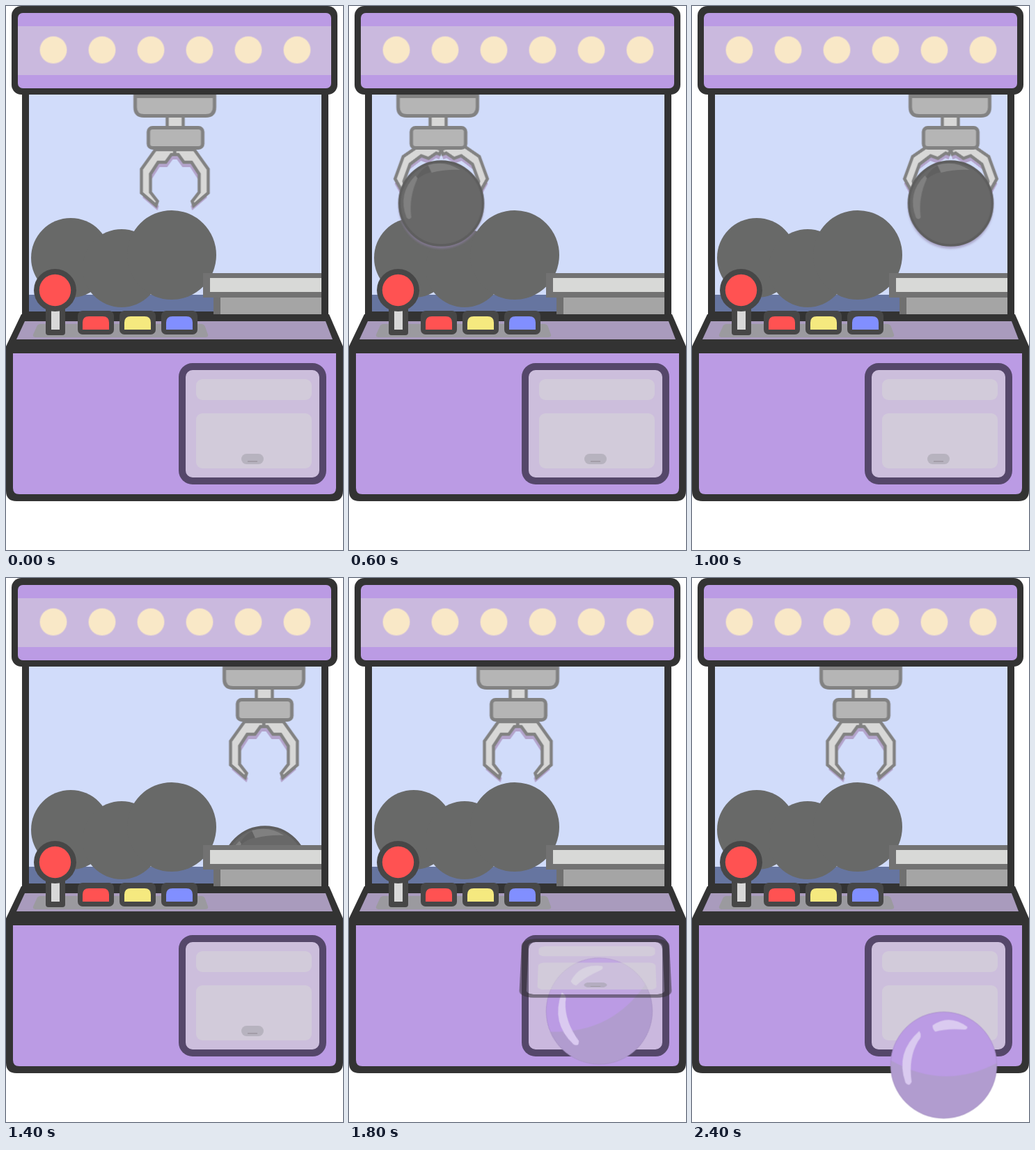
These frames come from a looping animation (484x780 px, 2.6 s). An HTML page:

```html
<!DOCTYPE html>
<html lang="en">
<head>
<meta charset="utf-8">
<title>Claw machine</title>
<style>
  html, body { margin: 0; width: 100%; height: 100%; overflow: hidden; background: #fff; }
  #stage { position: relative; width: 484px; height: 780px; overflow: hidden; }
  svg { position: absolute; left: 0; top: 0; display: block; }
  .metal { fill: #b5b5b5; stroke: #828282; stroke-width: 5; }
  .pale { fill: #d8d8d7; stroke: #828282; stroke-width: 4.5; }
  .dark { fill: #333; }
  .trim { fill: #474747; }
  .body { fill: #bb9be4; }
  .band { fill: #cab9de; }
  #flap {
    position: absolute; left: 248px; top: 512px; width: 212px; height: 174px;
    box-sizing: border-box; border: 10px solid transparent; border-radius: 20px;
    background: rgba(215, 215, 215, .2) padding-box;
    transform-origin: 50% 10px; z-index: 2;
  }
  #flap i { position: absolute; background: rgba(215, 215, 215, .5); border-radius: 9px; left: 15px; width: 166px; }
  #flap .slot { top: 13px; height: 30px; }
  #flap .tray { top: 62px; height: 79px; }
  #flap .grip { left: 80px; top: 120px; width: 32px; height: 15px; background: rgba(150, 150, 158, .45); }
  #flap .line { left: 89px; top: 130px; width: 14px; height: 2px; border-radius: 0; background: #a39da8; }
  #prize { z-index: 1; }
</style>
</head>
<body>
<div id="stage">
<svg width="484" height="780" viewBox="0 0 484 780">
  <defs>
    <path id="finger" stroke-linejoin="miter" d="M0 0H-28L-48 28V62L-27 80L-25 74L-35 61V35L-24 18H-13L-5 7H0Z"/>
    <g id="half">
      <use href="#finger" x="2" y="7" fill="#b3a3cb"/>
      <use href="#finger" class="pale"/>
    </g>
    <filter id="soft" x="-20%" y="-20%" width="140%" height="140%"><feGaussianBlur stdDeviation="1.5"/></filter>
  </defs>

  <!-- window -->
  <rect class="dark" x="23" y="120" width="440" height="332"/>
  <rect x="33" y="120" width="420" height="318" fill="#d1dcfa"/>
  <rect x="33" y="414" width="270" height="24" fill="#6675a0"/>
  <g fill="#686968">
    <circle cx="93" cy="361" r="57"/>
    <circle cx="166" cy="376" r="56"/>
    <circle cx="238" cy="357" r="64"/>
  </g>

  <g id="claw">
    <g id="head">
      <g id="fingers">
        <g class="finger"><use href="#half"/></g>
        <g transform="scale(-1 1)"><g class="finger"><use href="#half"/></g></g>
      </g>
      <rect class="pale" x="-11" y="60" width="23" height="116"/>
      <rect class="metal" x="-38" y="174.500" width="78" height="29" rx="6"/>
    </g>
    <path class="metal" d="M-57 129.500H57V145Q57 157.500 44.500 157.500H-44.500Q-57 157.500 -57 145Z"/>
  </g>

  <g id="catch">
    <circle cy="4" r="61" fill="#8f80a6" opacity=".6" filter="url(#soft)"/>
    <circle r="60" fill="#686868" stroke="#5e5e5e" stroke-width="3.500"/>
    <path fill="#606060" d="M-35 -38Q-28 -50 -18 -54L-14 -45Q-27 -42 -35 -34Z"/>
    <path fill="#808080" d="M-19 -55Q6 -62 27 -48Q6 -49 -14 -44ZM-37 -40Q-63 -14 -50 20Q-46 25 -43 20Q-47 -8 -34 -36Z"/>
  </g>

  <!-- chute -->
  <rect x="298" y="410" width="155" height="32" fill="#707070"/>
  <rect x="308" y="418" width="145" height="24" fill="#a5a5a5"/>
  <rect x="283" y="383" width="170" height="35" fill="#727272"/>
  <rect x="293" y="390" width="160" height="20" fill="#d8d9d7"/>
  <rect class="dark" x="453" y="120" width="10" height="332"/>

  <!-- sign -->
  <rect class="dark" x="8" y="0" width="468" height="127" rx="14"/>
  <rect class="body" x="17" y="10" width="450" height="108" rx="7"/>
  <rect class="band" x="17" y="29" width="450" height="70"/>
  <g id="lamps" fill="#f9e8c7" stroke="#f9e8c7" stroke-opacity=".4" stroke-width="2"></g>

  <!-- console and cabinet -->
  <path class="dark" d="M22 442H464L484 488V695Q484 710 469 710H15Q0 710 0 695V488Z"/>
  <path d="M27 452H459L469 478H15Z" fill="#a99bbd"/>
  <path class="body" d="M10 498H474V691Q474 700 465 700H19Q10 700 10 691Z"/>
  <path d="M50 456H280Q285 456 286 460L290 471Q291 475 286 475H43Q38 475 39 471L44 460Q45 456 50 456Z" fill="#9b9a9f"/>
  <g id="buttons"></g>
  <rect class="trim" x="57" y="425" width="28" height="47" rx="4"/>
  <rect x="65" y="430" width="12" height="34" fill="#d8d8d8"/>
  <circle class="trim" cx="70.500" cy="407.500" r="30.500"/>
  <circle cx="70.500" cy="407.500" r="22.700" fill="#ff5252"/>

  <rect x="253" y="517" width="202" height="164" rx="15" fill="#cab8de" stroke="#55476a" stroke-width="10"/>
</svg>

<svg id="prize" width="484" height="780" viewBox="0 0 484 780">
  <g id="ball">
    <circle r="76.500" fill="#b19ccf"/>
    <path class="body" d="M-76.200 -7A76.500 76.500 0 0 1 76.400 -3Q0 37 -76.200 -7Z"/>
    <path fill="#dacaf0" d="M-35 -49Q-70 -18 -55 25Q-50 32 -46 24Q-51 -10 -37 -34Q-30 -41 -35 -49Z"/>
    <path fill="#dacaf0" d="M-16 -57Q8 -74 34 -55Q34 -51 30 -51Q4 -53 -12 -48Q-16 -51 -16 -57Z"/>
    <circle r="76.200" fill="none" stroke="#8d79a8" stroke-opacity=".5" stroke-width=".6"/>
  </g>
</svg>

<div id="flap"><i class="slot"></i><i class="tray"></i><i class="grip"></i><i class="line"></i></div>
</div>

<script>
const LOOP = 2600, STEPS = 13;
const $ = id => document.getElementById(id);

$('lamps').innerHTML = Array.from({ length: 6 }, (_, i) =>
  `<circle cx="${68 + 70 * i}" cy="63" r="19"/>`).join('');

$('buttons').innerHTML = ['#ff5252', '#f5e97f', '#818fff'].map((color, i) => {
  const x = 103 + 60 * i;
  return `<rect class="trim" x="${x}" y="437" width="52" height="34" rx="7"/>
    <path d="M${x + 7} 464V454Q${x + 7} 445 ${x + 16} 445H${x + 36}Q${x + 45} 445 ${x + 45} 454V464Z" fill="${color}"/>`;
}).join('');

// changes: { step: value }; each value holds until the next one
function play(el, prop, changes) {
  const frames = [];
  let value;
  for (let i = 0; i < STEPS; i++) {
    if (i in changes) value = changes[i];
    frames.push({ offset: i ? i / STEPS - 1e-6 : 0, [prop]: value, easing: 'steps(1, end)' });
  }
  frames.push({ offset: 1, [prop]: value });
  el.animate(frames, { duration: LOOP, iterations: Infinity });
}

function mapSteps(changes, fn) {
  const out = {};
  for (const k in changes) out[k] = fn(...[].concat(changes[k]));
  return out;
}

const shift = (x, y) => `translate(${x}px, ${y}px)`;
const place = (x, y, turn) => `${shift(x, y)} rotate(${turn}deg)`;

play($('claw'), 'transform', mapSteps(
  { 0: 242.5, 1: 127.5, 4: 249, 5: 370.5, 8: 242.5 }, x => shift(x, 0)));
play($('head'), 'transform', mapSteps({ 0: 0, 2: 60, 3: 0 }, y => shift(0, y)));
play($('fingers'), 'transform', mapSteps(
  { 0: [0, 0], 1: [0, -4], 2: [5, 0], 4: [-3, 0], 5: [1, 0], 7: [0, 0], 8: [0, -4], 9: [0, 0], 10: [1, -4], 11: [0, 0] },
  (x, turn) => place(x, 206, turn)));
document.querySelectorAll('.finger').forEach(el =>
  play(el, 'transform', mapSteps({ 0: 0, 2: 20, 6: 24, 7: 0 }, a => `rotate(${a}deg)`)));

play($('catch'), 'opacity', { 0: 0, 2: 1, 8: 0 });
play($('catch'), 'transform', mapSteps(
  { 0: [132.5, 343.5], 3: [132.5, 283], 4: [246, 283], 5: [371.5, 283], 6: [371.5, 330], 7: [372, 417] }, shift));

play($('flap'), 'transform', mapSteps({ 0: 0, 9: 62, 10: 130.5, 11: 62, 12: 0 },
  a => `perspective(4100px) rotateX(${a}deg)`));
play($('flap'), 'borderColor', { 0: 'transparent', 9: 'rgba(51, 51, 51, .55)', 12: 'transparent' });

play($('prize'), 'opacity', { 0: 0, 9: 1 });
play($('prize'), 'zIndex', { 0: 1, 10: 3 });
play($('ball'), 'transform', mapSteps(
  { 0: [359.5, 621, -28], 10: [361.5, 698.5, -120], 11: [361.5, 698.5, -60], 12: [361.5, 698.5, 0] }, place));
</script>
</body>
</html>
```
